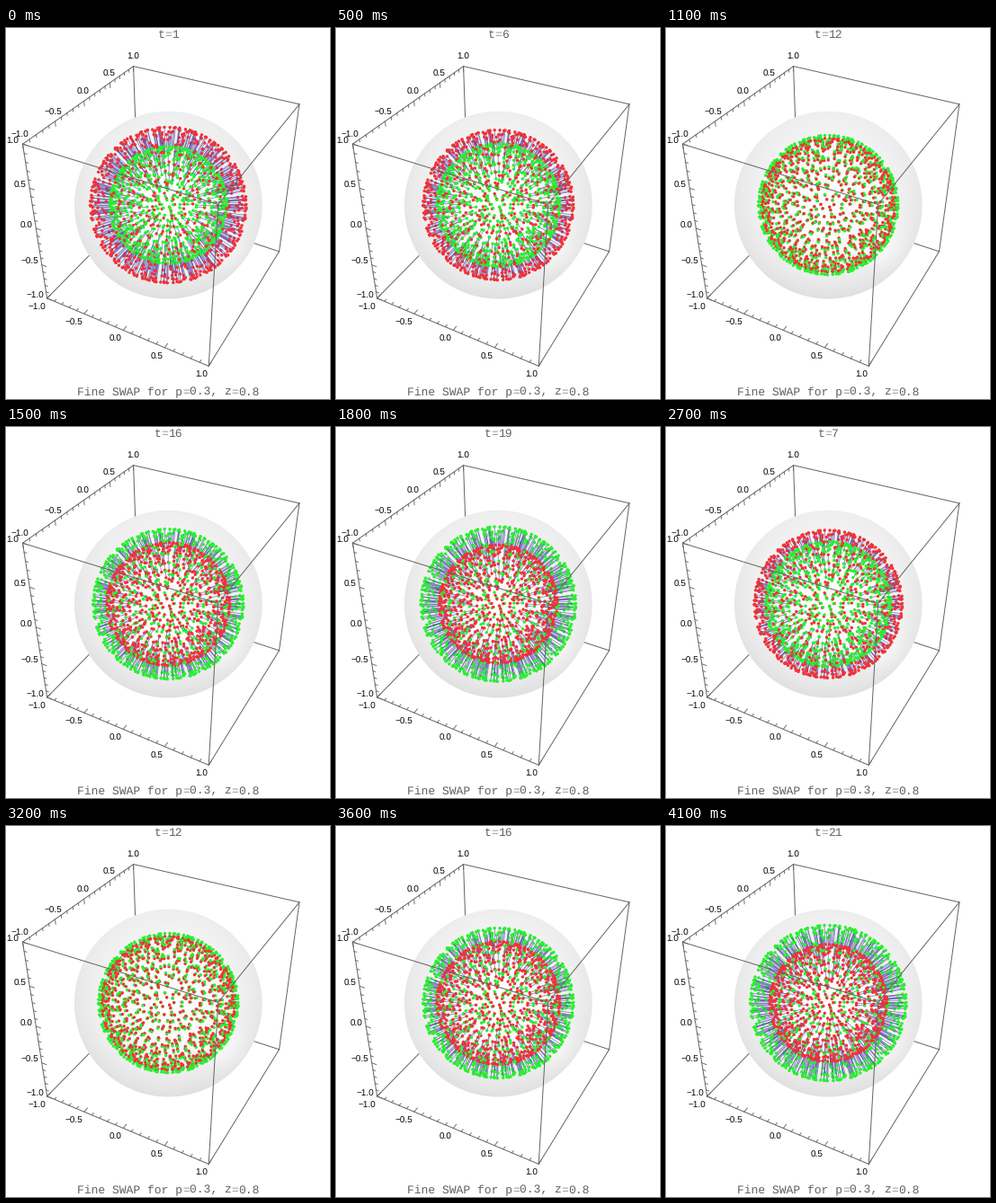
A matplotlib script that plays this animation: 360x413 px, repeating every 4200 ms.

```python
import numpy as np
import matplotlib.pyplot as plt
from matplotlib.animation import FuncAnimation
from matplotlib.collections import LineCollection

plt.rcParams["text.hinting"] = "none"
plt.rcParams["text.kerning_factor"] = 6

W, H, DPI = 360, 413, 64
PX = 72 / DPI                      # points per pixel
STEPS, LOOPS, INTERVAL = 21, 2, 100
COUNT = 900
OUTER, INNER = 0.834, 0.63
RED, GREEN, LINK = "#f03238", "#28f030", "#5a50ac"
EDGE, INK, FAINT = "#666666", "#606060", "#969696"

# perspective camera looking at the centre of the cube
EYE = np.array([2.6, -4.8, 4.0])
DIST = np.linalg.norm(EYE)
FORWARD = -EYE / DIST
RIGHT = np.cross(FORWARD, [0, 0, 1])
RIGHT /= np.linalg.norm(RIGHT)
UP = np.cross(RIGHT, FORWARD)
SCALE, CX, CY = 698.5, 180.3, 197.1


def project(p):
    """Return pixel positions and depths of 3D points."""
    p = np.asarray(p, float)
    depth = DIST + p @ FORWARD
    x = CX + SCALE * (p @ RIGHT) / depth
    y = CY - SCALE * (p @ UP) / depth
    return np.stack([x, y], axis=-1), depth


def sphere_points(count):
    """Evenly spread directions, loosened by a little seeded noise."""
    rng = np.random.default_rng(8)
    k = np.arange(count)
    z = 1 - (2 * k + 1) / count
    turn = k * np.pi * (3 - np.sqrt(5))
    ring = np.sqrt(1 - z ** 2)
    p = np.stack([ring * np.cos(turn), ring * np.sin(turn), z], axis=1)
    p += rng.normal(scale=0.04, size=p.shape)
    return p / np.linalg.norm(p, axis=1, keepdims=True)


fig = plt.figure(figsize=(W / DPI, H / DPI), dpi=DPI, facecolor="white")
ax = fig.add_axes([0, 0, 1, 1])
ax.axis("off")


def draw_sphere():
    radius = SCALE / np.sqrt(DIST ** 2 - 1)
    y, x = np.mgrid[0:H, 0:W] + 0.5
    u, v = (x - CX) / radius, (y - CY) / radius
    rho = np.hypot(u, v)
    glow = 10 * np.exp(-((u - 0.6) ** 2 + (v - 0.45) ** 2) / 0.06)
    shade = 2 + rho ** 2 * (22 + 7 * v) - glow
    img = np.ones((H, W, 4))
    img[..., :3] = (1 - shade / 255)[..., None]
    img[..., 3] = np.clip((1 - rho) * radius + 0.5, 0, 1)
    ax.imshow(np.clip(img, 0, 1), extent=(0, W, H, 0), aspect="auto",
              interpolation="nearest", zorder=2)


def draw_box():
    corners = [(x, y, z) for x in (-1, 1) for y in (-1, 1) for z in (-1, 1)]
    hidden, near = (-1, 1, -1), (1, -1, 1)
    for i, a in enumerate(corners):
        for b in corners[i + 1:]:
            if sum(m != n for m, n in zip(a, b)) != 1:
                continue
            (p, q), _ = project([a, b])
            z = 1 if hidden in (a, b) else 10 if near in (a, b) else 3
            ax.plot([p[0], q[0]], [p[1], q[1]], color=EDGE, lw=PX, zorder=z)


def draw_axis(start, along, inward, shift):
    """Ticks and labels on the edge leaving `start`; shift is the label offset."""
    start, along, inward = (np.array(v, float) for v in (start, along, inward))
    for k in range(-10, 11):
        at = start + along * (1 + k / 10)
        (p, q), _ = project([at, at + inward * 0.05])
        step = (q - p) / np.hypot(*(q - p))
        end = p + step * (5.5 if k % 5 == 0 else 3)
        ax.plot([p[0], end[0]], [p[1], end[1]], color=EDGE, lw=0.9 * PX, zorder=4)
        if k % 5 == 0:
            label = f"{k / 10:.1f}".replace("-", "\u2212")
            half = 10 if k < 0 else 7
            x = p[0] - step[0] * (4 + half) + shift[0]
            ax.text(x, p[1] + shift[1], label,
                    family="Liberation Sans", size=10 * PX, color="black",
                    ha="center", va="center_baseline", zorder=11)


def mono(text, baseline):
    """Centred monospace line with paler equals signs."""
    size, advance = 13, 7.8
    left = 180.5 - len(text) * advance / 2
    pieces, pos = [], 0
    for part in text.replace("=", "\n=\n").split("\n"):
        pieces.append(ax.text(left + pos * advance, baseline, part,
                              family="Liberation Mono", size=size * PX,
                              color=FAINT if part == "=" else INK, zorder=12))
        pos += len(part)
    return pieces


draw_sphere()
draw_box()
draw_axis((-1, -1, -1), (1, 0, 0), (0, 1, 0), (-2, 9))
draw_axis((-1, -1, 1), (0, 1, 0), (0, 0, -1), (-0.5, -11))
draw_axis((-1, -1, -1), (0, 0, 1), (1, 0, 0), (-0.5, -4))
mono("Fine SWAP for p=0.3, z=0.8", 409)

dirs = sphere_points(COUNT)
facing = dirs @ FORWARD < 0

# far half first, then near half
layers = []
for z, mask in ((5, ~facing), (7, facing)):
    links = LineCollection([], colors=LINK, linewidths=0.8 * PX, alpha=0.7, zorder=z)
    ax.add_collection(links)
    dots = ax.scatter([], [], s=(3.4 * PX) ** 2, linewidths=0, zorder=z + 1)
    layers.append((dirs[mask], links, dots))

ax.set_xlim(0, W)
ax.set_ylim(H, 0)
title = []


def update(n):
    step = n % STEPS
    swing = (OUTER - INNER) / 2 * np.cos(np.pi * step / (STEPS - 1))
    mean = (OUTER + INNER) / 2
    for d, links, dots in layers:
        red, red_depth = project(d * (mean + swing))
        green, green_depth = project(d * (mean - swing))
        links.set_segments(np.stack([red, green], axis=1))
        order = np.argsort(-np.concatenate([red_depth, green_depth]))
        colors = np.array([RED] * len(d) + [GREEN] * len(d))
        dots.set_offsets(np.concatenate([red, green])[order])
        dots.set_facecolor(colors[order])
    for piece in title:
        piece.remove()
    title[:] = mono(f"t={step + 1}", 11)
    return []


anim = FuncAnimation(fig, update, frames=STEPS * LOOPS, interval=INTERVAL,
                     init_func=lambda: update(0), repeat=True, repeat_delay=0)
plt.show()
```
